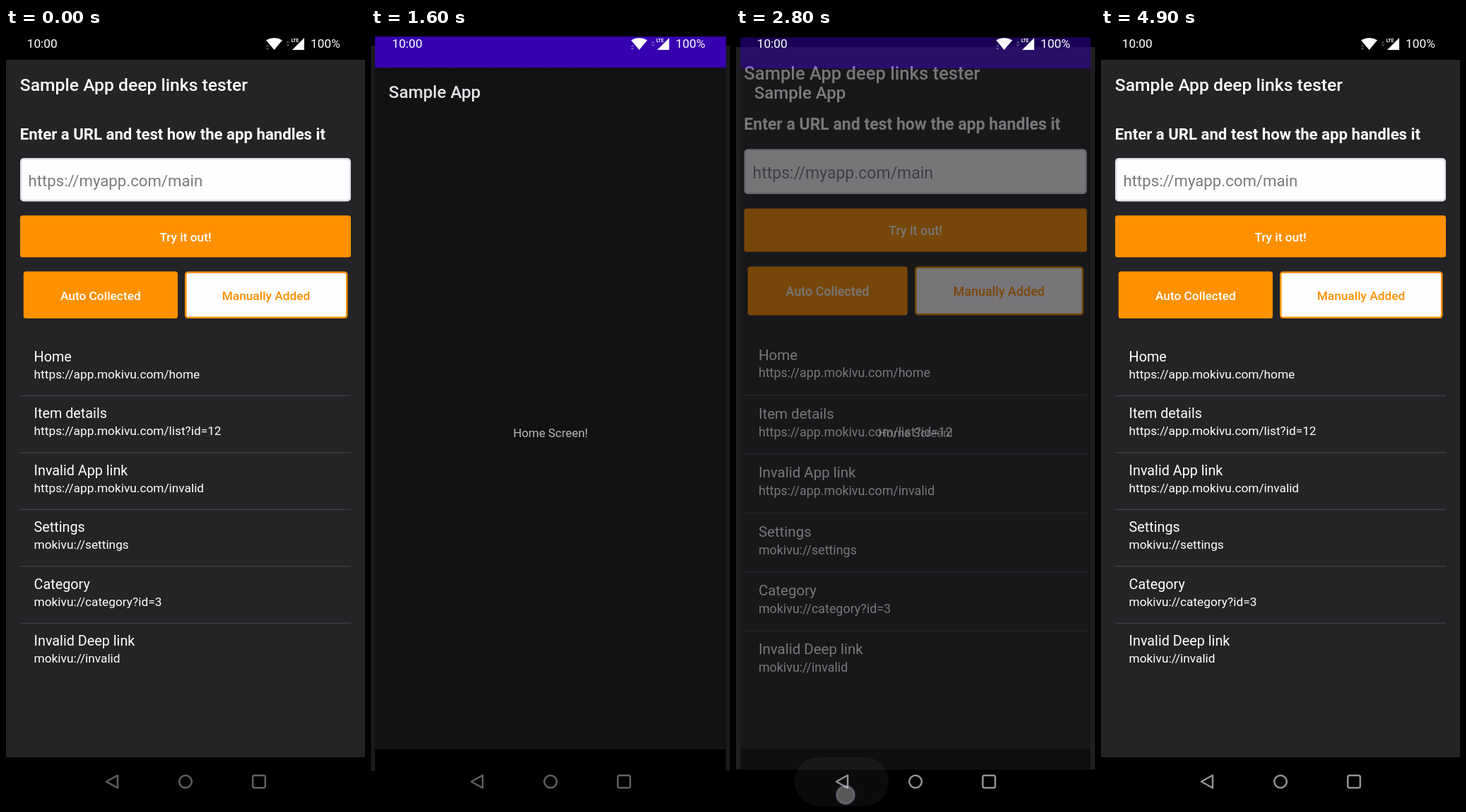
An HTML page with a canvas for the animation above (5 s loop, 508 by 1101 pixels).

```html
<!DOCTYPE html>
<html lang="en">
<head>
<meta charset="utf-8">
<title>Deep links tester</title>
<style>
html, body { margin: 0; width: 100%; height: 100%; overflow: hidden; background: #000; }
canvas { display: block; width: 508px; height: 1101px; }
</style>
</head>
<body>
<canvas id="stage" width="508" height="1101"></canvas>
<script>
const ctx = document.getElementById('stage').getContext('2d');
const W = 508, H = 1101, LOOP = 5000, STEP = 100;
const CX = W / 2, CY = 538.5, TOP = 45, BOTTOM = 1032;
const MARGIN = 19.8, SMALL = 17.3, BODY = 19.8, LARGE = 22.2, TITLE = 24.7;
const ORANGE = '#ff9100', WHITE = '#fffdff';
const OPEN = 1600, CLOSE = 2700;
const LINKS = [
  ['Home', 'https://app.mokivu.com/home'],
  ['Item details', 'https://app.mokivu.com/list?id=12'],
  ['Invalid App link', 'https://app.mokivu.com/invalid'],
  ['Settings', 'mokivu://settings'],
  ['Category', 'mokivu://category?id=3'],
  ['Invalid Deep link', 'mokivu://invalid']
];

// Progress from 0 to 1, starting at a given time.
const progress = (t, from, duration) => Math.min(1, Math.max(0, (t - from) / duration));

// Falls to a quarter with each step after the given time.
const settle = (t, from) => 4 ** ((from - t) / STEP);

function text(str, x, y, size, color, weight = 400, align = 'left') {
  ctx.font = `${weight} ${size}px Roboto, sans-serif`;
  ctx.textAlign = align;
  ctx.fillStyle = color;
  ctx.fillText(str, x, y);
}

function rect(x, y, w, h, color) {
  ctx.fillStyle = color;
  ctx.fillRect(x, y, w, h);
}

function box(x, y, w, h, r, color) {
  ctx.beginPath();
  ctx.roundRect(x, y, w, h, r);
  ctx.fillStyle = color;
  ctx.fill();
}

function borderedBox(x, y, w, h, r, color, border, line = 2.5) {
  box(x, y, w, h, r, border);
  box(x + line, y + line, w - 2 * line, h - 2 * line, r - line, color);
}

function poly(points, color) {
  ctx.beginPath();
  points.forEach(([x, y]) => ctx.lineTo(x, y));
  ctx.closePath();
  ctx.fillStyle = color;
  ctx.fill();
}

function scaled(scale, alpha, paint) {
  ctx.save();
  ctx.globalAlpha = alpha;
  ctx.translate(CX, CY);
  ctx.scale(scale, scale);
  ctx.translate(-CX, -CY);
  paint();
  ctx.restore();
}

function screen(barColor, pageColor, title, titleColor) {
  rect(0, 0, W, TOP, barColor);
  rect(0, TOP, W, BOTTOM - TOP, pageColor);
  rect(0, BOTTOM, W, H - BOTTOM, '#000');
  text(title, MARGIN, 89, TITLE, titleColor, 500);
}

function testerScreen() {
  screen('#000', '#242326', 'Sample App deep links tester', '#fff');
  text('Enter a URL and test how the app handles it', MARGIN, 158, LARGE, '#fff', 700);
  borderedBox(20, 184, 468, 61.5, 5, WHITE, '#e1dfe6');
  text('https://myapp.com/main', 31.6, 224, LARGE, '#7b797c');
  box(20, 265.3, 468, 59.2, 3.5, ORANGE);
  text('Try it out!', CX, 302, SMALL, '#fff', 500, 'center');
  box(24.8, 344.5, 218.2, 66.5, 3.5, ORANGE);
  text('Auto Collected', 133.8, 384.5, SMALL, '#fff', 500, 'center');
  borderedBox(253, 344.5, 230.5, 66.5, 4.5, WHITE, ORANGE);
  text('Manually Added', 368, 384.5, SMALL, ORANGE, 500, 'center');
  LINKS.forEach(([name, url], i) => {
    const y = 472 + i * 80.45;
    text(name, 2 * MARGIN, y, BODY, '#fff');
    text(url, 2 * MARGIN, y + 24, SMALL, '#fff');
    if (i < LINKS.length - 1) rect(20, y + 47.8, 468, 1.3, '#414043');
  });
}

function homeScreen() {
  screen('#3700b0', '#121114', 'Sample App', '#e3e2e4');
  text('Home Screen!', CX, 580, SMALL, '#b9b8ba', 400, 'center');
}

function smallArrows(x, y) {
  for (const side of [-1, 1]) {
    poly([[x - 2.6, y + side], [x, y + 3.6 * side], [x + 2.6, y + side]], 'rgba(255,255,255,.33)');
  }
}

function statusBar() {
  text('10:00', 29.7, 28.3, SMALL, '#fff');
  text('100%', 431, 28.3, SMALL, '#fff');
  ctx.beginPath();
  ctx.moveTo(379.5, 31);
  ctx.lineTo(368, 17.3);
  ctx.quadraticCurveTo(379.5, 10.7, 391, 17.3);
  ctx.closePath();
  ctx.fillStyle = '#fff';
  ctx.fill();
  smallArrows(370, 27.3);
  smallArrows(399, 22.3);
  poly([[422, 14], [422, 31], [405, 31], [414.5, 21.5]], '#fff');
  text('LTE', 403.8, 19.6, 6.4, '#fff', 700);
}

function navBar(color, ripple) {
  box(83, 1032, 133, 69, 34, `rgba(255,255,255,${0.09 * ripple})`);
  ctx.strokeStyle = color;
  ctx.lineWidth = 2.5;
  ctx.lineJoin = 'round';
  ctx.beginPath();
  ctx.moveTo(142, 1066.5);
  ctx.lineTo(158, 1057.5);
  ctx.lineTo(158, 1075.5);
  ctx.closePath();
  ctx.stroke();
  ctx.beginPath();
  ctx.arc(254, 1066.5, 8.8, 0, 2 * Math.PI);
  ctx.stroke();
  ctx.beginPath();
  ctx.roundRect(349.2, 1057.7, 17.6, 17.6, 2.5);
  ctx.stroke();
}

function touchDot(t, x, y, press, release) {
  const alpha = progress(t, press, STEP) * (1 - progress(t, release, 200)) ** 2;
  const radius = 16;
  const glow = ctx.createRadialGradient(x, y, 0, x, y, radius);
  glow.addColorStop(0, 'rgba(222,220,222,.65)');
  glow.addColorStop(.6, 'rgba(222,220,222,.65)');
  glow.addColorStop(.8, 'rgba(236,234,238,.76)');
  glow.addColorStop(.87, 'rgba(110,90,170,.35)');
  glow.addColorStop(1, 'rgba(70,50,130,0)');
  ctx.globalAlpha = alpha;
  box(x - radius, y - radius, 2 * radius, 2 * radius, radius, glow);
  ctx.globalAlpha = 1;
}

function draw(t) {
  const opening = t < CLOSE;
  const closing = progress(t, CLOSE, 200);
  const homeAlpha = t < OPEN ? 0 : 1 - closing;
  const homeScale = opening ? 1 - 0.0225 * settle(t, OPEN) : 1 - 0.05 * closing;
  const testerScale = 1 + (opening
    ? 0.04 * progress(t, OPEN - 200, 200) ** 3
    : 0.009 * settle(t, 2900));

  scaled(testerScale, 1, testerScreen);
  rect(0, 0, W, H, `rgba(0,0,0,${0.26 * homeAlpha})`);
  scaled(homeScale, homeAlpha, homeScreen);
  statusBar();
  navBar(opening || t === CLOSE ? '#606060' : '#929292', closing * (1 - progress(t, 2900, STEP)));
  touchDot(t, 254, 482, 1200, 1400);
  touchDot(t, 155, 1085.3, 2500, 2750);
}

const start = performance.now();
function tick() {
  const elapsed = (performance.now() - start) % LOOP;
  draw(Math.floor(elapsed / STEP) * STEP);
  requestAnimationFrame(tick);
}
tick();
</script>
</body>
</html>
```
